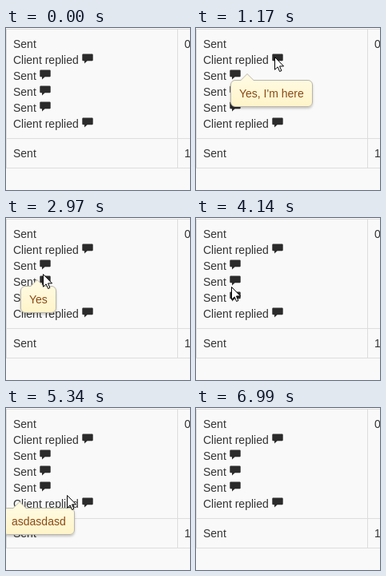
An HTML page for the animation above (7.32 s loop, 230 px wide and 203 px high).

```html
<!DOCTYPE html>
<html lang="en">
<head>
<meta charset="utf-8">
<title>Message status tooltips</title>
<style>
  html, body { margin: 0; width: 100%; height: 100%; overflow: hidden; background: #f9f9f9; }
  body { position: relative; font: 14px/20px "Liberation Sans", Arial, sans-serif; color: #333; }
  .cell { position: absolute; box-sizing: border-box; padding: 8px; border: 1px solid #ddd; white-space: pre; }
  .status { left: 0; width: 215px; }
  .count { left: 214px; width: 60px; }
  .icon { width: 14px; height: 14px; vertical-align: -1px; fill: #2b2b2b; }
  .tip {
    position: absolute; box-sizing: border-box; height: 34px; padding: 6px 10px; opacity: 0;
    border: 1px solid #b9b5aa; border-radius: 6px; white-space: pre; color: #8a4a14;
    background: linear-gradient(#fffae0, #fff4c9); box-shadow: 0 2px 3px rgba(0, 0, 0, .2);
  }
  .tip::before, .tip::after {
    content: ""; position: absolute; left: 12px; top: -9px;
    border: 8px solid transparent; border-top: 0; border-bottom: 8px solid #b9b5aa;
  }
  .tip::after { top: -8px; border-bottom-color: #fffae0; }
  #cursor { position: absolute; left: 0; top: 0; width: 14px; height: 21px; overflow: visible; }
</style>
</head>
<body>
<svg id="cursor" viewBox="0 0 14 21">
  <path d="M.5 .5V16.2L4.2 12.8 6.6 18.5 8.9 17.5 6.5 11.9H11.6Z" fill="#fff" stroke="#000"/>
</svg>
<script>
const LOOP = 7320, FADE = 300, HOLD = 680, SLIDE = 9, LINE = 20;
const cursor = document.getElementById("cursor");
const icon = '<svg class="icon" viewBox="0 0 14 14"><path d="M1 .6H13L13.7 1.3V8.6L13 9.3H6.6L3 12.6V9.3H1L.3 8.6V1.3Z"/></svg>';

function addBox(className, html, style) {
  const box = document.createElement("div");
  box.className = className;
  box.innerHTML = html;
  for (const name in style) box.style[name] = style[name] + "px";
  document.body.insertBefore(box, cursor);
  return box;
}

function addRow(top, lines, count) {
  const place = { top, height: lines.length * LINE + 18 };
  addBox("cell status", lines.join("\n"), place);
  addBox("cell count", count, place);
}

const sent = "Sent " + icon, replied = "Client replied " + icon;
addRow(1, ["Sent", replied, sent, sent, sent, replied], "0");
addRow(138, ["Sent"], "1");

function addTip(text, line, left, show) {
  return { el: addBox("tip", text, { left, top: 45 + line * LINE }), show };
}

const tips = [
  addTip("Yes, I'm here", 1, 43, 870),
  addTip("Yes", 2, 18, 2340),
  addTip("asdasdasd", 4, -4, 4710),
  addTip("Hello", 5, 67, 5980),
];

// The cursor glides from stop to stop.
const entry = { x: 209, y: 40 };
const moves = [
  { from: 150, to: 780, x: 98, y: 36 },
  { from: 1440, to: 1920, x: 51, y: 53 },
  { from: 2850, to: 3300, x: 44, y: 77 },
  { from: 4110, to: 4380, x: 43, y: 100 },
  { from: 5265, to: 5700, x: 105, y: 116 },
  { from: 6540, to: 6870, x: 231, y: 61 },
];

const progress = (t, from, to) => Math.min(1, Math.max(0, (t - from) / (to - from)));
const swing = k => (1 - Math.cos(Math.PI * k)) / 2;
const easeOut = k => 1 - (1 - k) ** 4;

function draw(t) {
  for (const { el, show } of tips) {
    const shown = swing(progress(t, show, show + FADE));
    const hidden = swing(progress(t, show + HOLD, show + HOLD + FADE));
    el.style.opacity = shown - hidden;
    el.style.transform = `translateY(${SLIDE * (1 - shown - hidden)}px)`;
  }

  let { x, y } = entry;
  for (const move of moves) {
    const k = easeOut(progress(t, move.from, move.to));
    x += (move.x - x) * k;
    y += (move.y - y) * k;
  }
  cursor.style.visibility = t < moves[0].from ? "hidden" : "visible";
  cursor.style.transform = `translate(${Math.round(x)}px, ${Math.round(y)}px)`;
}

const start = performance.now();
function tick() {
  draw((performance.now() - start) % LOOP);
  requestAnimationFrame(tick);
}
tick();
</script>
</body>
</html>
```
